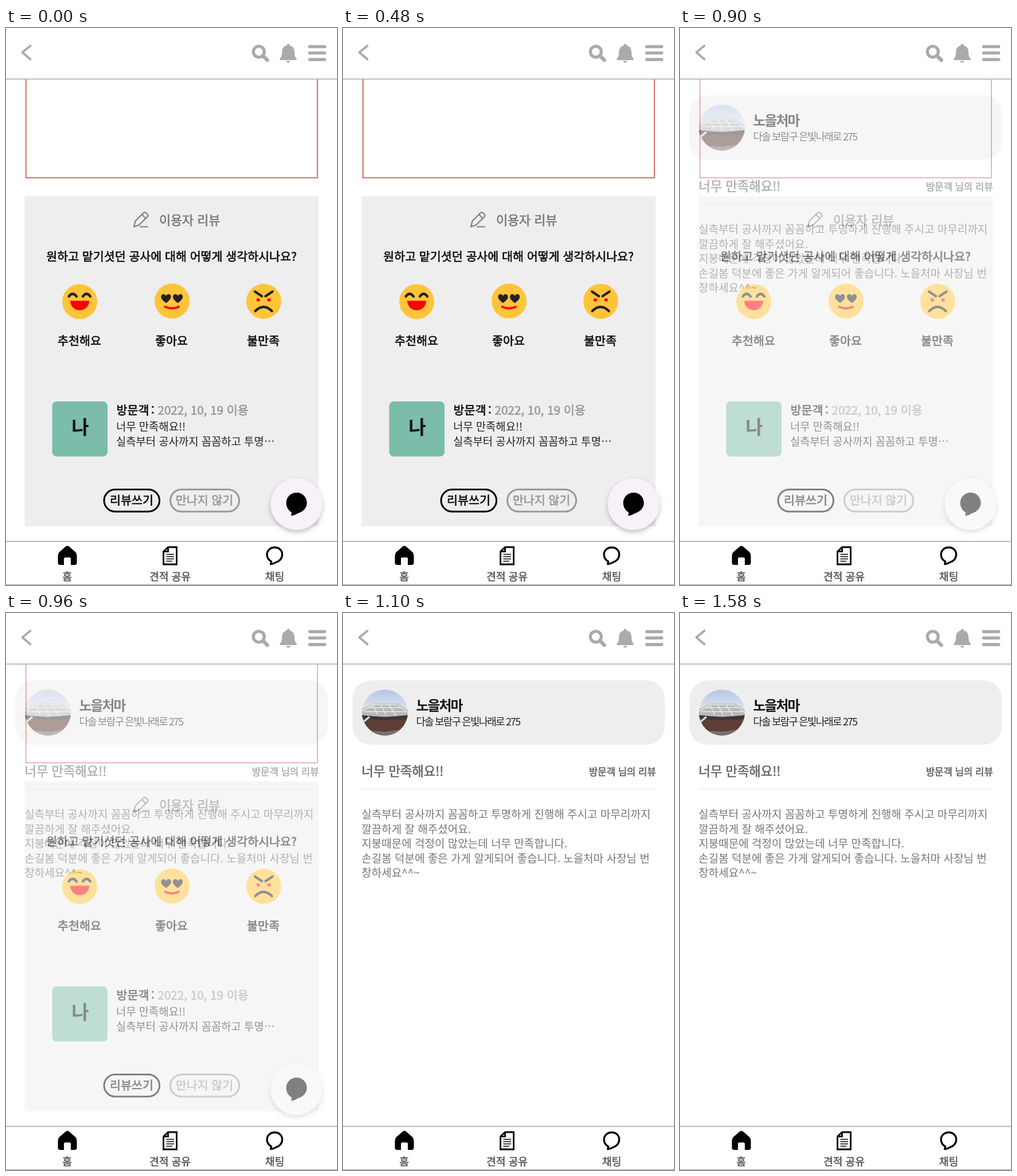
An HTML page that plays this animation: 577 by 971 pixels, repeating every 1.9 s.

```html
<!DOCTYPE html>
<html lang="ko">
<head>
<meta charset="utf-8">
<title>Review screens</title>
<style>
  html, body { margin: 0; width: 100%; height: 100%; overflow: hidden; background: #fff; }
  svg { display: block; width: 100%; height: 100%; }
  text { font-family: "Noto Sans CJK KR", "Noto Sans CJK", "Noto Sans", sans-serif; white-space: pre; fill: currentColor; }
  .mid { text-anchor: middle; }
  .end { text-anchor: end; }
  .b { font-weight: 700; }
  /* medium weight: regular glyphs with a thin outline */
  .m { stroke: currentColor; stroke-width: .65px; stroke-linejoin: round; }
  .line { fill: none; stroke-linecap: round; stroke-linejoin: round; }
  .label { font-size: 20.6px; color: #111; }
  .note { font-size: 18.8px; color: #222; }
  .body { font-size: 19px; color: #767676; }
  .tab { font-size: 18.2px; color: #5c5c5c; }
</style>
</head>
<body>
<svg viewBox="0 0 577 971" preserveAspectRatio="none">
  <defs>
    <clipPath id="content"><rect y="89" width="577" height="806"/></clipPath>
    <clipPath id="round"><circle cx="73" cy="173.5" r="40"/></clipPath>
    <linearGradient id="sky" x2="0" y2="1">
      <stop offset="0" stop-color="#b4c6e6"/>
      <stop offset=".45" stop-color="#dfe4ec"/>
    </linearGradient>
    <filter id="shadow" x="-30%" y="-30%" width="160%" height="160%">
      <feDropShadow dx="0" dy="4" stdDeviation="4" flood-opacity=".25"/>
    </filter>
    <path id="heart" d="M0 7.5C-4 4-8.5 1-8.5-3A4.3 4.3 0 0 1 0-4.5 4.3 4.3 0 0 1 8.5-3C8.5 1 4 4 0 7.5Z"/>
  </defs>

  <g clip-path="url(#content)">
    <!-- rating screen -->
    <g>
      <rect x="34.8" y="60" width="508" height="201.2" fill="none" stroke="#c9594c" stroke-width="1.7"/>
      <rect x="32.5" y="293.5" width="512.5" height="575" fill="#eee"/>

      <g class="line" stroke="#808080" stroke-width="2.2">
        <path d="M223 346.5L225.5 336.5L240 322Q242.5 320.5 245 323L246 324Q248.5 326.5 246.5 329L232 343.5Z"/>
        <path d="M237 325L243.5 332M234 346.5H247"/>
      </g>
      <text class="m" x="267" y="343" font-size="21.8" color="#7b7b7b">이용자 리뷰</text>
      <text class="label mid m" x="288.5" y="405.5">원하고 맡기셧던 공사에 대해 어떻게 생각하시나요?</text>

      <g fill="#ffc43a">
        <circle cx="128.5" cy="477" r="30.5"/>
        <circle cx="289.5" cy="476" r="30.5"/>
        <circle cx="449.3" cy="476.5" r="30.5"/>
      </g>
      <path d="M112 475.5H145C145 485 138 492 128.5 492S112 485 112 475.5Z" fill="#f00"/>
      <g class="line" stroke="#222" stroke-width="4.3">
        <path d="M109.5 468Q116 459 123 468M134 468Q140.5 459 147 468"/>
        <path d="M434 459.5L446 467.5M464.5 459.5L452.5 467.5"/>
        <path d="M434.5 493.5Q449 479 463.5 493.5"/>
      </g>
      <g fill="#222">
        <use href="#heart" x="279" y="472"/>
        <use href="#heart" x="299.5" y="472"/>
      </g>
      <path class="line" d="M277.5 486Q289.5 491.5 301 486" stroke="#f00" stroke-width="4"/>
      <g fill="#f01818">
        <ellipse cx="439.7" cy="474" rx="3.2" ry="3"/>
        <ellipse cx="458.5" cy="474" rx="3.2" ry="3"/>
      </g>
      <g class="label mid m">
        <text x="128" y="552.5">추천해요</text>
        <text x="288.5" y="552.5">좋아요</text>
        <text x="448.5" y="552.5">불만족</text>
      </g>

      <rect x="80.5" y="651" width="96.5" height="96" rx="8" fill="#7bbcab"/>
      <text class="mid b" x="129.5" y="708" font-size="33" color="#111">나</text>
      <text class="label m" x="192.5" y="673.5">방문객</text>
      <text class="label m" x="253" y="673.5">:</text>
      <text class="m" x="264.5" y="673.5" font-size="20.6" color="#999">2022, 10, 19 이용</text>
      <text class="note" x="192" y="701.5">너무 만족해요!!</text>
      <text class="note" x="192" y="727.5">실측부터 공사까지 꼼꼼하고 투명⋯</text>

      <g fill="none" stroke-width="3">
        <rect x="171" y="804.5" width="96.5" height="38.5" rx="19.2" stroke="#000"/>
        <rect x="286.5" y="804.5" width="120" height="38.5" rx="19.2" stroke="#999"/>
      </g>
      <text class="label mid m" x="219" y="831.3">리뷰쓰기</text>
      <text class="mid m" x="346" y="831.3" font-size="20.6" color="#999">만나지 않기</text>

      <circle cx="506.5" cy="830" r="45" fill="#f6f2f7" filter="url(#shadow)"/>
      <path d="M506.5 810C517 810 524.5 818 524.5 828C524.5 838 516 844 509 846Q503 850 497 850.5L498 844.5C492 841 488.5 835 488.5 828C488.5 818 496 810 506.5 810Z"/>
    </g>

    <!-- review detail screen -->
    <g id="detail" opacity="0">
      <rect y="89" width="577" height="806" fill="#fff"/>
      <rect x="16.5" y="117.5" width="544.5" height="112" rx="32" fill="#eee"/>
      <g clip-path="url(#round)">
        <rect x="33" y="133" width="80" height="81" fill="url(#sky)"/>
        <path d="M33 168L52 158H96L113 170V190H33Z" fill="#b6b9b8"/>
        <path class="line" d="M34 171L52 160H95L112 173M52 160L60 177M66 160L75 178M80 160L92 178M38 172H110M45 165H102" stroke="#e8ebea" stroke-width="1.5"/>
        <path d="M33 179L73 181L113 179V214H33Z" fill="#5e3e36"/>
        <path d="M33 178L72 182L113 178V185L72 187L33 184Z" fill="#3b3837"/>
        <path d="M45 205L73 207L104 203V214H45Z" fill="#77716c"/>
        <path d="M32 193L46 181" stroke="#e4e4e4" stroke-width="3"/>
      </g>
      <text class="b" x="127.5" y="169.5" font-size="23.8" letter-spacing="-1.9" color="#111">노을처마</text>
      <text x="127.5" y="195.5" font-size="17.8" letter-spacing="-1.7" color="#222">다솔 보람구 은빛나래로 275</text>

      <text class="m" x="32.5" y="284" font-size="22.2" color="#666">너무 만족해요!!</text>
      <text class="m end" x="545.5" y="283" font-size="16.7" color="#666">방문객 님의 리뷰</text>
      <path d="M33 307H545" stroke="#eee" stroke-width="1.5"/>
      <g id="review" class="body"></g>
    </g>
  </g>

  <!-- header -->
  <path d="M0 89H577" stroke="#a8aaa8" stroke-width="1.6"/>
  <g class="line" stroke="#aaa">
    <path d="M42.5 31L28.5 42.5L42.5 54.5" stroke-width="3.8"/>
    <circle cx="440.7" cy="41.3" r="9.5" stroke-width="5.3"/>
    <path d="M448 48.5L455.5 56" stroke-width="6.5"/>
    <path d="M529.5 32.5H555.5M529.5 43.5H555.5M529.5 55H555.5" stroke-width="5.6"/>
  </g>
  <path d="M492 27.5Q494.5 27.5 494.5 30.5C501 32 503 37 503 43C503 49 504.5 51 506.5 53Q507.5 56 505 56H479Q476.5 56 477.5 53C479.5 51 481 49 481 43C481 37 483 32 489.5 30.5Q489.5 27.5 492 27.5ZM488.5 57.5H495.5Q495 60.5 492 60.5T488.5 57.5Z" fill="#aaa"/>

  <!-- tab bar -->
  <path d="M0 895H577" stroke="#a4a4a4" stroke-width="1.6"/>
  <path d="M0 970.3H577" stroke="#bbb" stroke-width="1.4"/>
  <path d="M104 904Q107 901.5 110 904L121 913.5Q123.5 916 123.5 920V932Q123.5 936 119.5 936H113V925.5Q113 923 110.5 923H103.5Q101 923 101 925.5V936H94.5Q90.5 936 90.5 932V920Q90.5 916 93 913.5Z"/>
  <g fill="none" stroke="#000">
    <path d="M282.5 905H297.5V935H274.5V912.5ZM282.5 905V912.5H274.5" stroke-width="2.8"/>
    <path d="M279.5 917.5H293M279.5 921.5H293M279.5 925.5H293M279.5 929.5H290" stroke-width="1.6"/>
    <path d="M468.5 905.5C476.5 905.5 481.5 911 481.5 918C481.5 925 476 930 470.5 931.5Q466 934.5 461.5 934.5L462.5 930C458 927.5 455 923.5 455 918C455 911 460.5 905.5 468.5 905.5Z" stroke-width="3.3" stroke-linejoin="round"/>
  </g>
  <g class="tab mid m">
    <text x="106.5" y="962.8">홈</text>
    <text x="286" y="962.8">견적 공유</text>
    <text x="468.5" y="962.8">채팅</text>
  </g>
</svg>
<script>
  const LOOP = 1900, FADE_START = 800, STEP = 100, STEPS = 4;
  const detail = document.getElementById("detail");

  const lines = [
    "실측부터 공사까지 꼼꼼하고 투명하게 진행해 주시고 마무리까지",
    "깔끔하게 잘 해주셨어요.",
    "지붕때문에 걱정이 많았는데 너무 만족합니다.",
    "손길봄 덕분에 좋은 가게 알게되어 좋습니다. 노을처마 사장님 번",
    "창하세요^^~"
  ];
  document.getElementById("review").innerHTML = lines
    .map((line, i) => `<text x="32.3" y="${358 + i * 25.6}">${line}</text>`)
    .join("");

  // The cross-fade advances in hard steps of one quarter.
  function render(time) {
    const step = Math.floor((time - FADE_START) / STEP) + 1;
    detail.setAttribute("opacity", Math.max(0, Math.min(STEPS, step)) / STEPS);
  }

  const start = performance.now();
  function tick() {
    render((performance.now() - start) % LOOP);
    requestAnimationFrame(tick);
  }
  tick();
</script>
</body>
</html>
```
